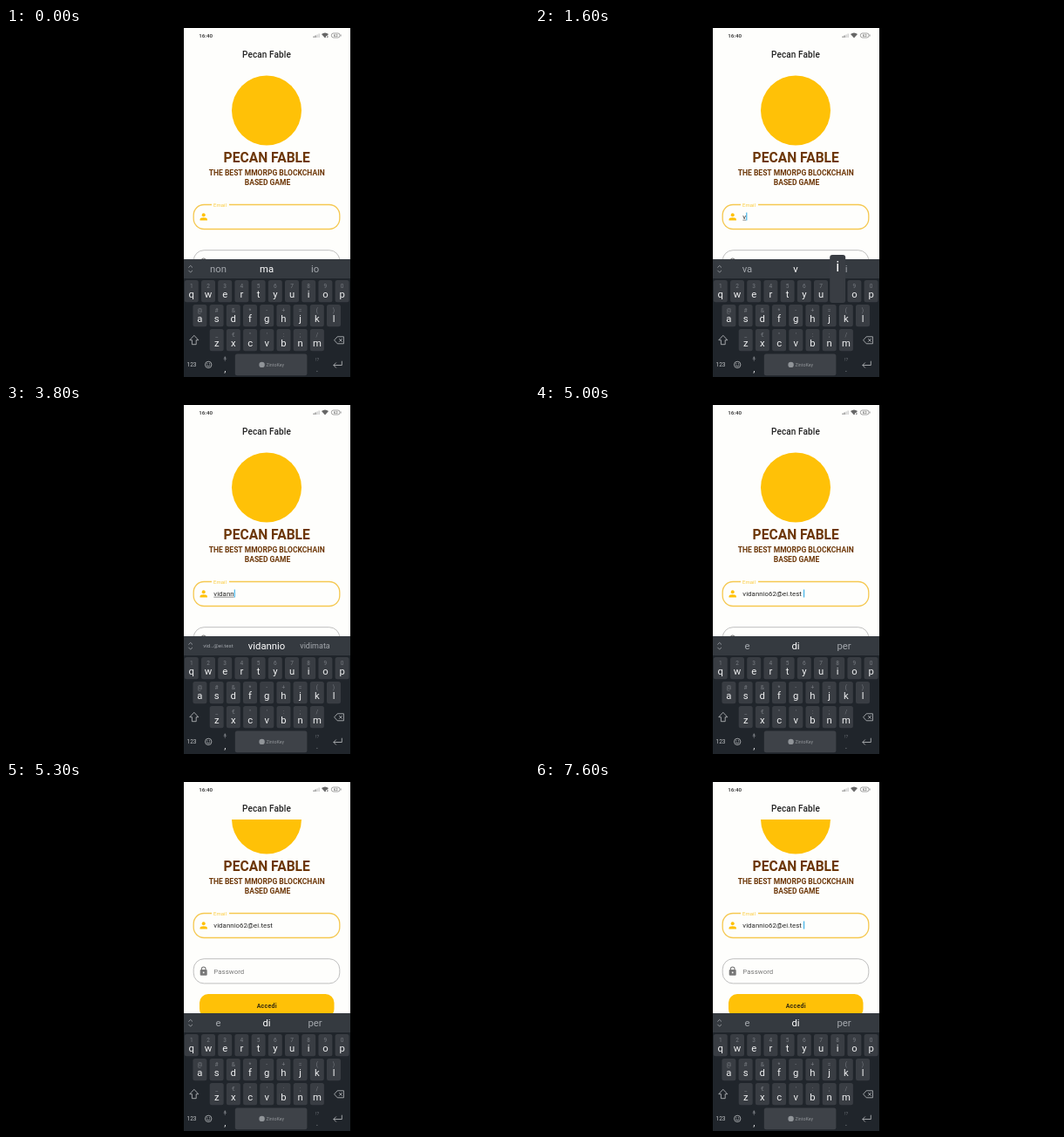
These frames come from a looping animation (600 px wide and 400 px high, 8000 ms). An HTML page with a canvas:

```html
<!DOCTYPE html>
<html lang="en">
<head>
<meta charset="utf-8">
<title>Login screen</title>
<style>
html, body { margin: 0; width: 100%; height: 100%; overflow: hidden; background: #000; }
canvas { display: block; width: 600px; height: 400px; }
</style>
</head>
<body>
<canvas id="stage"></canvas>
<script>
const LOOP = 8000, STEP = 100;
const LEFT = 204, WIDTH = 191;
const AMBER = '#ffc107', BROWN = '#6d3708', PAPER = '#fefefc';
const BOARD = '#20252b', BAR = '#353a40', KEY = '#393d43', DIM = '#a4a8ad', ICON = '#bfc2c5';

const canvas = document.getElementById('stage');
const scale = window.devicePixelRatio || 1;
canvas.width = 600 * scale;
canvas.height = 400 * scale;
const c = canvas.getContext('2d');
c.scale(scale, scale);

// [start time, typed text, three suggestions]
const MAIL = 'vid…@ei.test';
const edits = [
  [100, '', ['non', 'ma', 'io']],
  [1500, 'v', ['va', 'v', 'vi']],
  [1700, 'vi', ['vita', 'vi', 'vista']],
  [2100, 'vid', ['vidimai', 'vid', 'vidimare di']],
  [2300, 'vida', [MAIL, 'vida', 'vidi']],
  [2700, 'vidan', [MAIL, 'vidan', 'vidimata']],
  [2800, 'vidann', [MAIL, 'vidannio', 'vidimata']],
  [4600, 'vidannio62@ei.test ', ['e', 'di', 'per']]
];
// [press, release, letter]
const presses = [[1400, 1500, 'v'], [1600, 1700, 'i'], [2000, 2100, 'd'], [2200, 2300, 'a'], [2500, 2700, 'n']];
// [letters, hints, first centre, top]
const rows = [
  ['qwertyuiop', '1234567890', 212.8, 289],
  ['asdfghjkl', '@#&*-+=()', 222.4, 317],
  ['zxcvbnm', '_€"\':;/', 241.7, 345]
];
const PITCH = 19.2;

function text(s, x, y, size, color, align = 'center', weight = 400, spacing = 0) {
  c.font = `${weight} ${size}px Roboto, sans-serif`;
  c.letterSpacing = spacing + 'px';
  c.textAlign = align;
  c.fillStyle = color;
  c.fillText(s, x, y);
  return c.measureText(s).width;
}

function rect(x, y, w, h, color, r = 0) {
  c.fillStyle = color;
  c.beginPath();
  c.roundRect(x, y, w, h, r);
  c.fill();
}

function circle(x, y, r, color) {
  c.fillStyle = color;
  c.beginPath();
  c.arc(x, y, r, 0, 7);
  c.fill();
}

function line(d, color, width = 1) {
  c.strokeStyle = color;
  c.lineWidth = width;
  c.stroke(new Path2D(d));
}

function shape(d, color) {
  c.fillStyle = color;
  c.fill(new Path2D(d));
}

function outline(x, y, w, h, r, color, width) {
  c.strokeStyle = color;
  c.lineWidth = width;
  c.beginPath();
  c.roundRect(x, y, w, h, r);
  c.stroke();
}

function statusBar(t) {
  text('16:40', 221.2, 10.9, 6.2, '#444', 'left', 700);
  for (let i = 0; i < 4; i++) rect(352.5 + i * 2, 9.5 - i, 1.3, 1.5 + i, i < 2 ? '#888' : '#ccc');
  shape('M362 7Q366 3.8 370 7L366 11.6Z', '#666');
  const traffic = t < 1000 || (t >= 2000 && t < 3000) || (t >= 5000 && t < 7000);
  if (traffic) {
    rect(367, 9, 3, 3, PAPER);
    shape('M367.6 9.6h2.4l-1.2 1.9z', '#777');
  }
  outline(373.4, 6, 9.6, 5, 2.2, '#888', 0.8);
  rect(383.6, 7.4, 0.9, 2.2, '#888');
  text('62', 378.2, 10.2, 4.3, '#777', 'center', 700);
}

function emailField(t, edit) {
  outline(215.2, 202.5, 167.6, 28, 12, '#f5c850', 1.3);
  rect(236, 200, 20, 5, PAPER);
  text('Email', 238, 205, 6, '#fbcb3c', 'left');
  circle(226.7, 214.2, 2, AMBER);
  shape('M222.5 220.6v-1.2q0-2.2 4.2-2.2t4.2 2.2v1.2z', AMBER);

  const [start, typed] = edit;
  const w = text(typed, 238.3, 218.6, 7.8, '#252525', 'left', 400, 0.07);
  if (typed && !typed.includes('@')) rect(238.3, 219.8, w, 0.6, '#444');
  if (Math.floor((t - start) / 500) % 2 === 0) rect(238.4 + w, 211.5, 1.1, 9, '#35aee6');
}

function content(t, edit) {
  const p = Math.min(1, Math.max(0, (t - 5000) / 300));
  c.save();
  c.beginPath();
  c.rect(LEFT, 43, WIDTH, 222);
  c.clip();
  c.translate(0, -52 * (1 - (1 - p) ** 2));

  circle(299, 94.5, 40, AMBER);
  text('PECAN FABLE', 299.2, 154.4, 15.6, BROWN, 'center', 600);
  text('THE BEST MMORPG BLOCKCHAIN', 299.2, 168.8, 8.5, BROWN, 'center', 700);
  text('BASED GAME', 300, 180.4, 8.5, BROWN, 'center', 700);

  emailField(t, edit);

  outline(215.2, 254.7, 167.6, 28.2, 12, '#b8b8b8', 0.9);
  rect(222.7, 267, 8, 6.8, '#777', 1);
  line('M224.4 267.5v-1.2a2.3 2.3 0 0 1 4.6 0v1.2', '#777', 1.1);
  circle(226.7, 270.4, 0.9, PAPER);
  text('Password', 238.3, 271.5, 7.8, '#777', 'left', 400, 0.07);

  rect(222, 295, 154.5, 27, AMBER, 10);
  text('Accedi', 299.2, 310.8, 7, '#332a10', 'center', 700, 0.25);
  c.restore();
}

function suggestions(t, words) {
  rect(LEFT, 265, WIDTH, 22, BAR);
  if (t >= 4500 && t < 4600) rect(221, 266, 44, 20, '#50555c', 3);
  line('M209.4 274.6l2.3-2.3 2.3 2.3M209.4 277.8l2.3 2.3 2.3-2.3', DIM, 0.8);
  words.forEach((word, i) => {
    const middle = i === 1;
    c.font = '400 10px Roboto, sans-serif';
    c.letterSpacing = '0px';
    const size = Math.min(11.3, (middle ? 44 : 34.5) / c.measureText(word).width * 10);
    text(word, 243.5 + i * 55.5, 276 + size * 0.34, size, middle ? '#fff' : DIM);
  });
}

function keyboard(t) {
  rect(LEFT, 287, WIDTH, 113, BOARD);
  for (const [letters, hints, first, top] of rows) {
    [...letters].forEach((letter, i) => {
      const x = first + i * PITCH;
      rect(x - 8, top, 16, 25.3, KEY, 2.5);
      text(hints[i], x, top + 9.2, 6.5, '#777b81');
      text(letter, x, top + 20.2, 11.3, '#eeeff0');
    });
  }

  line('M215.8 352.3l5 5.4h-2.6v5h-4.8v-5h-2.6z', ICON, 0.8);
  line('M380.2 353.8h7.2v8h-7.2l-3.6-4zM382.2 356l3.4 3.6M385.6 356l-3.4 3.6', ICON, 0.8);

  text('123', 213, 388.3, 6.6, ICON);
  outline(228.5, 382.2, 7.4, 7.4, 3.7, ICON, 0.8);
  circle(230.9, 384.8, 0.6, ICON);
  circle(233.5, 384.8, 0.6, ICON);
  line('M230.2 386.7q2 2.2 4 0', ICON, 0.8);
  rect(250.4, 376.6, 1.8, 3.4, '#777b81', 0.9);
  line('M249.4 379q1.9 3 3.8 0M251.3 380.6v1.4', '#777b81', 0.6);
  text(',', 251.3, 394, 11, '#eeeff0');
  rect(262.8, 373.5, 82.6, 24.8, '#3e4248', 2.5);
  circle(293.6, 385.9, 3.2, '#909498');
  text('ZintoKey', 298.4, 387.8, 5.3, '#909498', 'left');
  text('!?', 357, 381.6, 5.5, '#686c72');
  text('.', 357, 394, 11, '#777b81');
  line('M385.3 381.7v4.8h-9.4M378.8 383.5l-3 3 3 3', ICON, 0.8);

  const press = presses.find(([down, up]) => t >= down && t < up);
  if (press) popup(press[2]);
}

function popup(letter) {
  const [letters, , first, top] = rows.find(row => row[0].includes(letter));
  const x = first + letters.indexOf(letter) * PITCH;
  rect(x - 9, top - 29, 18, 55, KEY, 3);
  text(letter, x, top - 9.8, 16.5, '#fff');
}

function draw(t) {
  const edit = edits.findLast(e => t >= e[0]) || edits[0];
  rect(0, 0, 600, 400, '#000');
  rect(LEFT, 0, WIDTH, 400, PAPER);
  statusBar(t);
  text('Pecan Fable', 299, 33.5, 10, '#222', 'center', 500, 0.1);
  content(t, edit);
  suggestions(t, edit[2]);
  keyboard(t);
}

const begin = performance.now();
function tick() {
  const t = (performance.now() - begin) % LOOP;
  draw(Math.floor(t / STEP) * STEP);
  requestAnimationFrame(tick);
}
tick();
</script>
</body>
</html>
```
